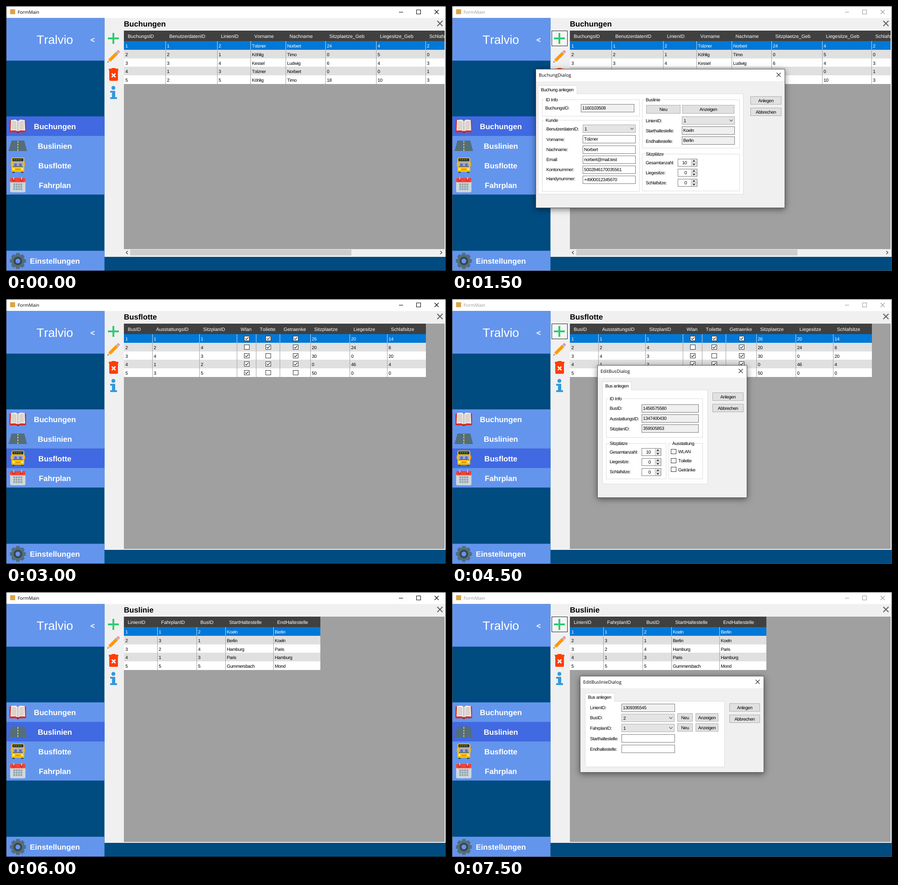
These frames come from a looping animation (963x581 px, 8 s). An HTML page with a canvas:

```html
<!DOCTYPE html>
<html lang="de">
<head>
<meta charset="utf-8">
<title>FormMain</title>
<style>
html, body { margin: 0; width: 100%; height: 100%; overflow: hidden; background: #f0f0f0; }
canvas { display: block; }
</style>
</head>
<body>
<canvas id="stage" width="963" height="581"></canvas>
<script>
const ctx = document.getElementById('stage').getContext('2d');
const LOOP = 8000, STEP = 1500;
const SANS = '"Liberation Sans", Arial, sans-serif';
const UI = '"Open Sans", sans-serif';
const FACE = '#f0f0f0', NAVY = '#004b80', SKY = '#6495ed', ROYAL = '#4169e1', GRAY = '#a0a0a0';
const TIGHT = -.43;
ctx.textRendering = 'geometricPrecision';
ctx.fontKerning = 'none';

// ---- basic helpers ----
function box(x, y, w, h, fill, line) {
  if (fill) { ctx.fillStyle = fill; ctx.fillRect(x, y, w, h); }
  if (line) { ctx.strokeStyle = line; ctx.lineWidth = 1; ctx.strokeRect(x + .5, y + .5, w - 1, h - 1); }
}
function round(x, y, w, h, r, fill) {
  ctx.fillStyle = fill;
  ctx.beginPath(); ctx.roundRect(x, y, w, h, r); ctx.fill();
}
function disc(x, y, r, fill) {
  ctx.fillStyle = fill;
  ctx.beginPath(); ctx.arc(x, y, r, 0, 7); ctx.fill();
}
function poly(points, fill) {
  ctx.fillStyle = fill;
  ctx.beginPath();
  points.forEach(([x, y]) => ctx.lineTo(x, y));
  ctx.fill();
}
function path(points, color, width = 1) {
  ctx.strokeStyle = color; ctx.lineWidth = width;
  ctx.beginPath();
  points.forEach(([x, y], i) => i ? ctx.lineTo(x, y) : ctx.moveTo(x, y));
  ctx.stroke();
}
function cross(x, y, r, color, width = 1) {
  path([[x - r, y - r], [x + r, y + r]], color, width);
  path([[x + r, y - r], [x - r, y + r]], color, width);
}
// y is the middle of the capital letters
function text(s, x, y, { size = 10, color = '#000', font = SANS, align = 'left', gap = 0, weight = 400 } = {}) {
  ctx.font = `${weight} ${size}px ${font}`;
  ctx.letterSpacing = gap + 'px';
  ctx.textAlign = align;
  ctx.fillStyle = color;
  ctx.fillText(s, x, y + size * .36);
}
const small = (s, x, y, more) => text(s, x, y, { gap: TIGHT, ...more });

// ---- icons ----
function plus() {
  box(223, 69, 24, 4, '#2ecc71');
  box(233, 59, 4, 24, '#2ecc71');
}
function pencil() {
  ctx.save();
  ctx.translate(222, 124); ctx.rotate(-Math.PI / 4);
  poly([[0, 0], [7, -3.4], [7, 3.4]], '#f5c99b');
  poly([[0, 0], [2.6, -1.3], [2.6, 1.3]], '#37474f');
  box(6.5, -3.4, 22.5, 6.8, '#ff9800');
  box(29, -3.4, 3, 6.8, '#b0bec5');
  round(32, -3.4, 4.5, 6.8, 2, '#f48fb1');
  ctx.restore();
}
function trash() {
  round(231, 136, 9, 4, 1, '#ff3d00');
  round(225, 137.5, 21, 4, 1, '#ff3d00');
  round(226, 140, 19, 24, 2.5, '#ff3d00');
  cross(235.5, 152, 4, '#fff', 2.6);
}
function info() {
  disc(235, 179.5, 4.3, '#3498db');
  box(228, 186, 11, 4, '#3498db');
  box(232, 186, 7, 17, '#3498db');
  box(228, 200, 15, 4, '#3498db');
}
function book() {
  round(7.5, 251, 36.5, 26, 2, '#d32f2f');
  disc(26, 276, 2.8, '#b71c1c');
  for (const d of [-1, 1]) {
    poly([[26, 252], [26 + d * 5, 249], [26 + d * 15, 250], [26 + d * 16, 273],
      [26 + d * 6, 272.5], [26, 275]], '#f0ebe6');
    for (let i = 0; i < 6; i++)
      path([[26 + d * 3, 255.5 + i * 3], [26 + d * 8, 253.5 + i * 3], [26 + d * 13, 254 + i * 3]], '#a79d97', .9);
  }
  path([[26, 252], [26, 275]], '#8d7f7a', 1);
}
function road() {
  poly([[12, 295], [40, 295], [46, 318], [5.5, 318]], '#546e7a');
  for (let i = 0; i < 4; i++) box(25, 296 + i * 6, 1.8, 3.6, '#ffd740');
}
function bus() {
  box(14, 361, 5, 5, '#37474f');
  box(33, 361, 5, 5, '#37474f');
  box(10, 343, 32, 8, '#e0a000');
  round(12, 332.5, 28, 31, 3, '#ffc107');
  round(14, 334, 24, 6.5, 1, '#263238');
  for (let i = 0; i < 4; i++) box(17 + i * 4.6, 336.5, 2.8, 1.3, '#9bc34a');
  box(14.5, 342.5, 23, 10, '#9fa8da');
  disc(21, 348, 3, '#5c6bc0');
  disc(31.5, 348, 3, '#5c6bc0');
  box(15, 351, 22, 1.6, '#455a64');
  disc(16.5, 357.5, 2, '#fff8d5');
  disc(35.5, 357.5, 2, '#fff8d5');
  box(21, 357, 10, 3, '#e09a00');
}
function calendar() {
  round(9, 378, 33.5, 30.5, 3, '#cfd8dc');
  round(9, 377, 33.5, 9.5, 2.5, '#f44336');
  for (const x of [17, 34]) {
    disc(x, 381, 3, '#c62828');
    round(x - 1.3, 374.5, 2.6, 7, 1.2, '#b0bec5');
  }
  for (let r = 0; r < 3; r++)
    for (let c = 0; c < 4; c++) box(16 + c * 5.2, 389 + r * 5.2, 4, 4, '#90a4ae');
}
function gear() {
  ctx.save();
  ctx.translate(26, 559);
  for (let i = 0; i < 8; i++) {
    poly([[-5, -12], [-3.6, -17.5], [3.6, -17.5], [5, -12]], '#546e7a');
    ctx.rotate(Math.PI / 4);
  }
  disc(0, 0, 14, '#546e7a');
  disc(0, 0, 9.3, '#37474f');
  disc(0, 0, 5.2, SKY);
  ctx.restore();
}

// ---- form controls ----
function check(x, y, on) {
  box(x, y, 12, 11, '#fff', '#333');
  if (on) path([[x + 2.5, y + 5.5], [x + 5, y + 8], [x + 9.5, y + 3]], '#222', 1.2);
}
function chevron(x, y) {
  path([[x - 3.5, y - 1.8], [x, y + 1.8], [x + 3.5, y - 1.8]], '#444', 1.1);
}
function field(x, y, w, value, locked) {
  box(x, y, w, 18, locked ? FACE : '#fff', '#7a7a7a');
  small(value, x + 3, y + 8.7);
}
function combo(x, y, w, value) {
  box(x, y, w, 18, '#e4e4e4', '#adadad');
  small(value, x + 4, y + 9.2);
  chevron(x + w - 8, y + 9);
}
function button(x, y, w, label, h = 18) {
  box(x, y, w, h, '#e1e1e1', '#adadad');
  small(label, x + w / 2, y + h / 2 + .3, { align: 'center' });
}
function spinner(x, y, value) {
  box(x, y, 43, 17, '#fff', '#7a7a7a');
  small(value, x + 20, y + 8.5, { align: 'right' });
  box(x + 29, y + 1, 13, 15, FACE);
  for (const d of [-1, 1]) {
    const m = y + 8.5 + d * 3.8;
    box(x + 29.5, m - 3.3, 12, 6.6, '#e6e6e6');
    poly([[x + 32.5, m - d * 1.3], [x + 38.5, m - d * 1.3], [x + 35.5, m + d * 2]], '#222');
  }
  path([[x + 29.5, y + 1], [x + 29.5, y + 16]], '#c4c4c4');
  path([[x + 30, y + 8.5], [x + 42, y + 8.5]], '#b0b0b0');
}
function group(x, y, w, h, label) {
  box(x, y, w, h, null, '#dcdcdc');
  ctx.font = '10px ' + SANS;
  ctx.letterSpacing = TIGHT + 'px';
  box(x + 6, y - 2, ctx.measureText(label).width + 4, 5, '#fff');
  small(label, x + 8, y);
}
function labels(x, list) {
  list.forEach(([s, y]) => small(s, x, y));
}
function dialog(x, y, w, h, title, tab, page) {
  ctx.save();
  ctx.shadowColor = 'rgba(0,0,0,.5)';
  ctx.shadowBlur = 13;
  ctx.shadowOffsetY = 3;
  box(x, y, w, h, FACE);
  ctx.restore();
  box(x, y, w, 27, '#fff');
  box(x, y, w, h, null, '#555');
  text(title, x + 7, y + 13.5, { font: UI });
  cross(x + w - 14, y + 12.8, 4.5, '#111', 1.1);
  const [px, py, pw, ph, tw] = page;
  box(px, py, pw, ph, '#fff', '#dcdcdc');
  box(px, py - 18, tw, 19, '#fff', '#dcdcdc');
  box(px + 1, py - 1, tw - 2, 3, '#fff');
  small(tab, px + 6.5, py - 8.5);
}

function bookingDialog() {
  dialog(183, 138, 546, 305, 'BuchungDialog', 'Buchung anlegen', [188, 192, 450, 221, 86]);
  group(197, 205, 214, 37, 'ID Info');
  labels(204, [['BuchungsID:', 223]]);
  field(282, 215, 117, '1160103508', true);

  group(197, 250, 214, 157, 'Kunde');
  labels(206.5, [['BenutzerdatenID:', 269], ['Vorname:', 292], ['Nachname:', 314],
    ['Email:', 336], ['Kontonummer:', 358], ['Handynummer:', 378.5]]);
  combo(286, 260, 116, '1');
  ['Tolzner', 'Norbert', 'norbert@mail.test', '5002846170035561', '+4900012345670']
    .forEach((v, i) => field(286, Math.round(283.4 + i * 22.2), 116, v));

  group(416, 205, 214, 107, 'Buslinie');
  button(425, 217, 75, 'Neu', 19);
  button(504, 217, 114, 'Anzeigen', 19);
  labels(424, [['LinienID:', 251.5], ['Starthaltestelle:', 273], ['Endhaltestelle:', 296]]);
  combo(503, 242, 116, '1');
  field(503, 264, 116, 'Koeln', true);
  field(503, 286, 116, 'Berlin', true);

  group(416, 324, 214, 82, 'Sitzplätze');
  labels(424, [['Gesamtanzahl:', 343], ['Liegesitze:', 365], ['Schlafsitze:', 387]]);
  ['10', '0', '0'].forEach((v, i) => spinner(494, 335 + i * 22, v));
  button(653, 198, 68, 'Anlegen');
  button(653, 223, 68, 'Abbrechen');
}

function busDialog() {
  dialog(318, 145, 328, 291, 'EditBusDialog', 'Bus anlegen', [329, 199, 231, 207, 64]);
  group(337, 218, 212, 86, 'ID Info');
  labels(345, [['BusID:', 239], ['AusstattungsID:', 262], ['SitzplanID:', 284]]);
  ['1456575580', '1347400430', '359505853']
    .forEach((v, i) => field(415, Math.round(231 + i * 22.2), 125, v, true));

  group(337, 316, 132, 79, 'Sitzplätze');
  labels(345, [['Gesamtanzahl:', 335], ['Liegesitze:', 356.5], ['Schlafsitze:', 378.5]]);
  ['10', '0', '0'].forEach((v, i) => spinner(415, 327 + i * 22, v));

  group(474, 316, 75, 79, 'Ausstattung');
  ['WLAN', 'Toilette', 'Getränke'].forEach((s, i) => {
    check(479, Math.round(329 + i * 19.7), false);
    small(s, 495, 334.5 + i * 19.7);
  });
  button(570, 205, 68, 'Anlegen');
  button(570, 230, 68, 'Abbrechen');
}

function lineDialog() {
  dialog(280, 184, 403, 212, 'EditBuslinieDialog', 'Bus anlegen', [291, 239, 306, 145, 65]);
  labels(302, [['LinienID:', 253.5], ['BusID:', 275.5], ['FahrplanID:', 298],
    ['Starthaltestelle:', 321], ['Endhaltestelle:', 344]]);
  field(371, 245, 117, '1309395545', true);
  [['2', 267], ['1', 289]].forEach(([v, y]) => {
    combo(371, y, 116, v);
    button(493, y - 1, 34, 'Neu');
    button(533, y - 1, 50, 'Anzeigen');
  });
  field(371, 312, 117, '');
  field(371, 335, 117, '');
  button(607, 244, 67, 'Anlegen');
  button(607, 269, 67, 'Abbrechen');
}

// ---- pages ----
const pages = [
  {
    title: 'Buchungen', item: 0, scroll: true, dialog: bookingDialog,
    edges: [258, 349, 462, 535, 612, 699, 810, 918, 1010],
    heads: 'BuchungsID BenutzerdatenID LinienID Vorname Nachname Sitzplaetze_Geb Liegesitze_Geb Schlafsitze_Geb',
    rows: ['1 1 2 Tolzner Norbert 24 4 2', '2 2 1 Köhlig Timo 0 5 0', '3 3 4 Kessel Ludwig 6 4 3',
      '4 1 3 Tolzner Norbert 0 0 1', '5 2 5 Köhlig Timo 18 10 3']
  },
  {
    title: 'Busflotte', item: 2, dialog: busDialog,
    edges: [258, 320, 423, 505, 547, 599, 666, 752, 834, 919],
    heads: 'BusID AusstattungsID SitzplanID Wlan Toilette Getraenke Sitzplaetze Liegesitze Schlafsitze',
    rows: ['1 1 1 + + + 26 20 14', '2 2 4 - + + 20 24 6', '3 4 3 + - + 30 0 20',
      '4 1 2 + + + 0 46 4', '5 3 5 + - - 50 0 0']
  },
  {
    title: 'Buslinie', item: 1, dialog: lineDialog,
    edges: [258, 331, 417, 480, 585, 688],
    heads: 'LinienID FahrplanID BusID StartHaltestelle EndHaltestelle',
    rows: ['1 1 2 Koeln Berlin', '2 3 1 Berlin Koeln', '3 2 4 Hamburg Paris',
      '4 1 3 Paris Hamburg', '5 5 5 Gummersbach Mond']
  }
];

function table({ edges, heads, rows, scroll }) {
  const right = edges[edges.length - 1], bottom = scroll ? 533 : 548;
  ctx.save();
  ctx.beginPath(); ctx.rect(258, 54, 702, bottom - 54); ctx.clip();
  box(258, 54, 702, bottom - 54, GRAY);
  box(258, 54, right - 258, 23, '#404040');
  heads.split(' ').forEach((s, i) => text(s, edges[i] + 8.5, 66.5, { size: 10.5, color: '#fff' }));
  rows.forEach((row, r) => {
    const top = Math.round(77 + r * 18.8), end = Math.round(77 + (r + 1) * 18.8);
    box(258, top, right - 258, end - top, r === 0 ? '#0078d7' : r % 2 ? '#e0e0e0' : '#fff');
    row.split(' ').forEach((v, c) => {
      if (c) box(edges[c], top, 1, end - top, r ? GRAY : '#cfdbe5');
      if (v === '+' || v === '-') check(Math.round((edges[c] + edges[c + 1]) / 2) - 5, top + 4, v === '+');
      else small(v, edges[c] + 3.3, top + 10, { color: r ? '#000' : '#fff' });
    });
  });
  ctx.restore();
  if (scroll) {
    box(258, 533, 702, 15, FACE);
    box(272, 534, 484, 13, '#cdcdcd');
    path([[266.5, 537], [263, 540.5], [266.5, 544]], '#444', 1.4);
    path([[950.5, 537], [954, 540.5], [950.5, 544]], '#444', 1.4);
  }
}

function titleBar(active) {
  const ink = active ? '#000' : '#999';
  box(0, 0, 963, 26.5, '#fff');
  box(9, 7, 11, 11, '#dca548');
  text('FormMain', 25.5, 13.8, { font: UI, size: 9.9, color: ink });
  path([[860, 13.5], [869, 13.5]], ink);
  box(898, 8, 10, 10, null, ink);
  cross(942.5, 13, 4.5, ink, 1.1);
}

function sidebar(item) {
  const width = 215.5, label = { size: 16.7, weight: 700, color: '#fff', align: 'center' };
  box(0, 26.5, width, 554.5, NAVY);
  box(0, 26.5, width, 93.3, SKY);
  text('Tralvio', 107, 73, { size: 26.6, color: '#fff', align: 'center' });
  text('<', 189.5, 73.5, label);
  box(0, 242, width, 171.4, SKY);
  box(0, 242 + item * 42.85, width, 42.85, ROYAL);
  box(0, 536.6, width, 44.4, SKY);
  ['Buchungen', 'Buslinien', 'Busflotte', 'Fahrplan'].forEach((s, i) => text(s, 107, 264 + i * 42.85, label));
  text('Einstellungen', 107, 558.5, label);
  [book, road, bus, calendar, gear].forEach(icon => icon());
}

function draw(step) {
  const page = pages[step >> 1], open = step % 2 === 1;
  box(0, 0, 963, 581, FACE);
  titleBar(!open);
  sidebar(page.item);
  box(215.5, 550, 747.5, 31, NAVY);
  text(page.title, 258, 39, { size: 16.7, weight: 700 });
  cross(949.7, 38.3, 5.7, '#696969', 2.2);
  if (open) box(218, 54, 35, 34, '#f6f6f6', '#222');
  [plus, pencil, trash, info].forEach(icon => icon());
  table(page);
  box(0, 0, 963, 581, null, open ? '#444' : '#111');
  if (open) page.dialog();
}

function tick(now) {
  draw(Math.floor((now % LOOP) / STEP));
  requestAnimationFrame(tick);
}
tick(0);
</script>
</body>
</html>
```
